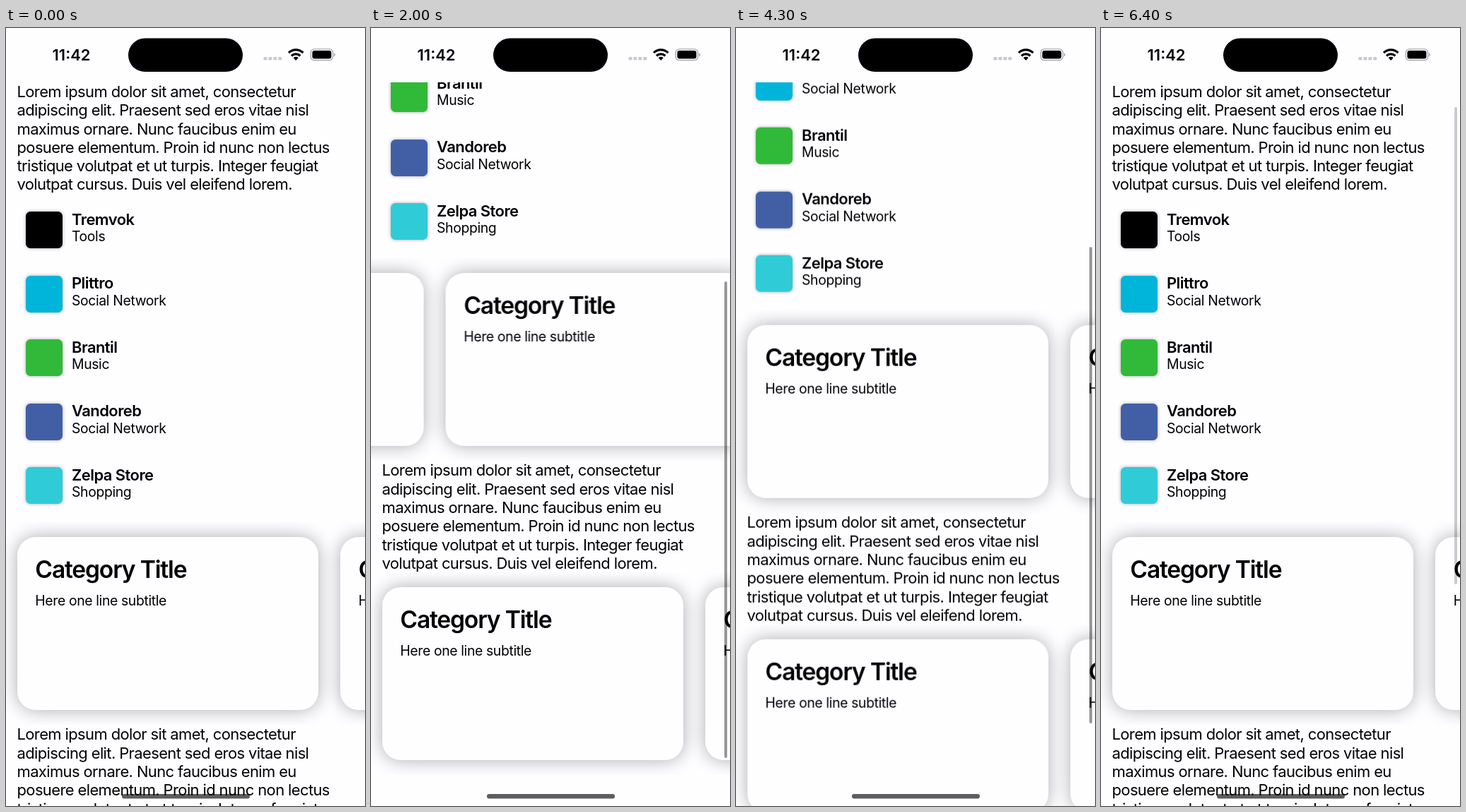
Animation of 508x1102 px, one loop 6500 ms. Source, as an HTML page:

```html
<!DOCTYPE html>
<html lang="en">
<head>
<meta charset="utf-8">
<title>Scrolling page</title>
<style>
  html, body { margin: 0; width: 100%; height: 100%; overflow: hidden; background: #fefdff; }
  body {
    position: relative; color: #000; white-space: nowrap;
    font: 400 21.97px/26.28px Inter, Roboto, sans-serif;
    letter-spacing: -.028em; font-optical-sizing: none;
  }
  p { margin: 0; }
  #view { position: absolute; top: 76.5px; left: 0; right: 0; bottom: 0; overflow: hidden; }
  #page, .strip { will-change: transform; }
  .lorem { padding-left: 15.5px; height: 157.7px; }
  #apps { padding: 6.6px 0; }
  .app { position: relative; height: 90.5px; }
  .icon {
    position: absolute; left: 28.4px; top: 19.2px; width: 51.7px; height: 51.7px;
    border-radius: 6.5px; box-shadow: 0 0 5px rgba(0, 0, 0, .33);
  }
  .label { position: absolute; left: 93px; top: 16.6px; }
  .name { font-weight: 600; letter-spacing: -.025em; }
  .small { font-size: 19.39px; line-height: 23.3px; letter-spacing: -.019em; }
  .row { position: relative; height: 287px; overflow: hidden; }
  .card {
    position: absolute; top: 20.7px; width: 426.4px; height: 245.6px; box-sizing: border-box;
    padding: 25.85px; border-radius: 26px; background: #fefdff;
    box-shadow: 0 0 26px rgba(0, 0, 0, .33);
  }
  .card h2 { margin: 0 0 13px; font: 600 33.6px/40.1px Inter, Roboto, sans-serif; letter-spacing: -.035em; }
  #bar { position: absolute; left: 500.2px; width: 4px; border-radius: 2px; background: #000; }
  #clock {
    position: absolute; left: 42.5px; top: 25px; width: 100px; text-align: center;
    font-weight: 600; letter-spacing: 0;
  }
  #chrome { position: absolute; left: 0; top: 0; }
</style>
</head>
<body>
<div id="view"><div id="page"></div></div>
<div id="bar"></div>
<div id="clock">11:42</div>
<svg id="chrome" width="508" height="1102" viewBox="0 0 508 1102">
  <rect x="173" y="14.5" width="162" height="47.6" rx="23.8"/>
  <g fill="#c9c8ca">
    <rect x="364.5" y="41" width="5" height="4.6" rx="1.4"/>
    <rect x="371.4" y="41" width="5" height="4.6" rx="1.4"/>
    <rect x="378.3" y="41" width="5" height="4.6" rx="1.4"/>
    <rect x="385.2" y="41" width="5" height="4.6" rx="1.4"/>
  </g>
  <g fill="none" stroke="#000" stroke-width="3.2">
    <path d="M400 35.2a14.4 14.4 0 0 1 20.4 0"/>
    <path d="M404 39.5a8.8 8.8 0 0 1 12.4 0"/>
  </g>
  <path d="M406.7 42.3a5 5 0 0 1 7 0l-3.5 3.7z"/>
  <rect x="431.2" y="29.9" width="31.4" height="15.8" rx="5" fill="none" stroke="#a5a4a6" stroke-width="1.3"/>
  <rect x="433.4" y="32.1" width="27" height="11.4" rx="3.2"/>
  <path d="M464.2 35.2q3.6 2.6 0 5.2z" fill="#a5a4a6"/>
  <rect x="164" y="1085" width="181" height="6.4" rx="3.2" fill="#000" fill-opacity=".63"/>
</svg>
<script>
const $ = id => document.getElementById(id);

const LOREM = `<p class="lorem">${[
  'Lorem ipsum dolor sit amet, consectetur',
  'adipiscing elit. Praesent sed eros vitae nisl',
  'maximus ornare. Nunc faucibus enim eu',
  'posuere elementum. Proin id nunc non lectus',
  'tristique volutpat et ut turpis. Integer feugiat',
  'volutpat cursus. Duis vel eleifend lorem.'
].join('<br>')}</p>`;

const APPS = [
  ['Tremvok', 'Tools', '#000'],
  ['Plittro', 'Social Network', '#00b5d9'],
  ['Brantil', 'Music', '#31b939'],
  ['Vandoreb', 'Social Network', '#425fa6'],
  ['Zelpa Store', 'Shopping', '#2fccd8']
];

const app = ([name, kind, color]) => `<div class="app">
  <div class="icon" style="background:${color}"></div>
  <div class="label"><p class="name">${name}</p><p class="small">${kind}</p></div>
</div>`;

const card = i => `<div class="card" style="left:${15.5 + i * 457.4}px">
  <h2>Category Title</h2><p class="small">Here one line subtitle</p>
</div>`;

const ROW = `<div class="row"><div class="strip">${[0, 1, 2, 3].map(card).join('')}</div></div>`;

$('page').innerHTML = LOREM + `<div id="apps">${APPS.map(app).join('')}</div>` + ROW + LOREM + ROW;
const strips = document.querySelectorAll('.strip');

const LOOP = 6500, STEP = 100;
const MAX = 374;          // vertical scroll range
const SWIPE = 440;        // horizontal swipe distance
const BAR = { top: 112, track: 922, size: 675.5 };

// Cubic from p0 to p1 over t0..t1 (ms) with end speeds in px/s.
function glide(t, t0, t1, p0, p1, v0, v1) {
  const T = (t1 - t0) / 1000, u = (t - t0) / (t1 - t0), w = 1 - u;
  return p0 * w * w * (1 + 2 * u) + p1 * u * u * (3 - 2 * u) + T * u * w * (v0 * w - v1 * u);
}

// Critically damped overshoot, entered at the edge with speed v.
function bounce(t, t0, v) {
  const s = (t - t0) / 1000;
  return v * s * Math.exp(-10.9 * s);
}

function scrollAt(t) {
  if (t < 560) return 0;
  if (t < 847) return glide(t, 560, 847, 0, MAX, 0, 903);
  if (t < 4090) return MAX + bounce(t, 847, 903);
  if (t < 4670) return glide(t, 4090, 4670, MAX, 0, 0, -780);
  return bounce(t, 4670, -780);
}

function swipeAt(t, start, edge) {
  const turn = edge - 450;
  if (t < start) return 0;
  if (t < turn) return glide(t, start, turn, 0, SWIPE, 300, 0);
  if (t < edge) return glide(t, turn, edge, SWIPE, 0, 0, -800);
  return bounce(t, edge, -800);
}

function drawBar(t, y) {
  const inside = Math.min(MAX, Math.max(0, y));
  const size = BAR.size - Math.abs(y - inside);
  const top = y > MAX ? BAR.top + BAR.track - size
                      : BAR.top + (BAR.track - BAR.size) * inside / MAX;
  const fade = t < 600 ? 0 : Math.min(1, (6571 - t) / 340);
  Object.assign($('bar').style, { top: top + 'px', height: size + 'px', opacity: .4 * fade });
}

function draw() {
  const t = Math.floor((performance.now() + 10) % LOOP / STEP) * STEP;
  const y = scrollAt(t);
  $('page').style.transform = `translateY(${-y}px)`;
  strips[0].style.transform = `translateX(${-swipeAt(t, 1550, 2623)}px)`;
  strips[1].style.transform = `translateX(${-swipeAt(t, 2780, 3555)}px)`;
  drawBar(t, y);
  requestAnimationFrame(draw);
}
draw();
</script>
</body>
</html>
```
